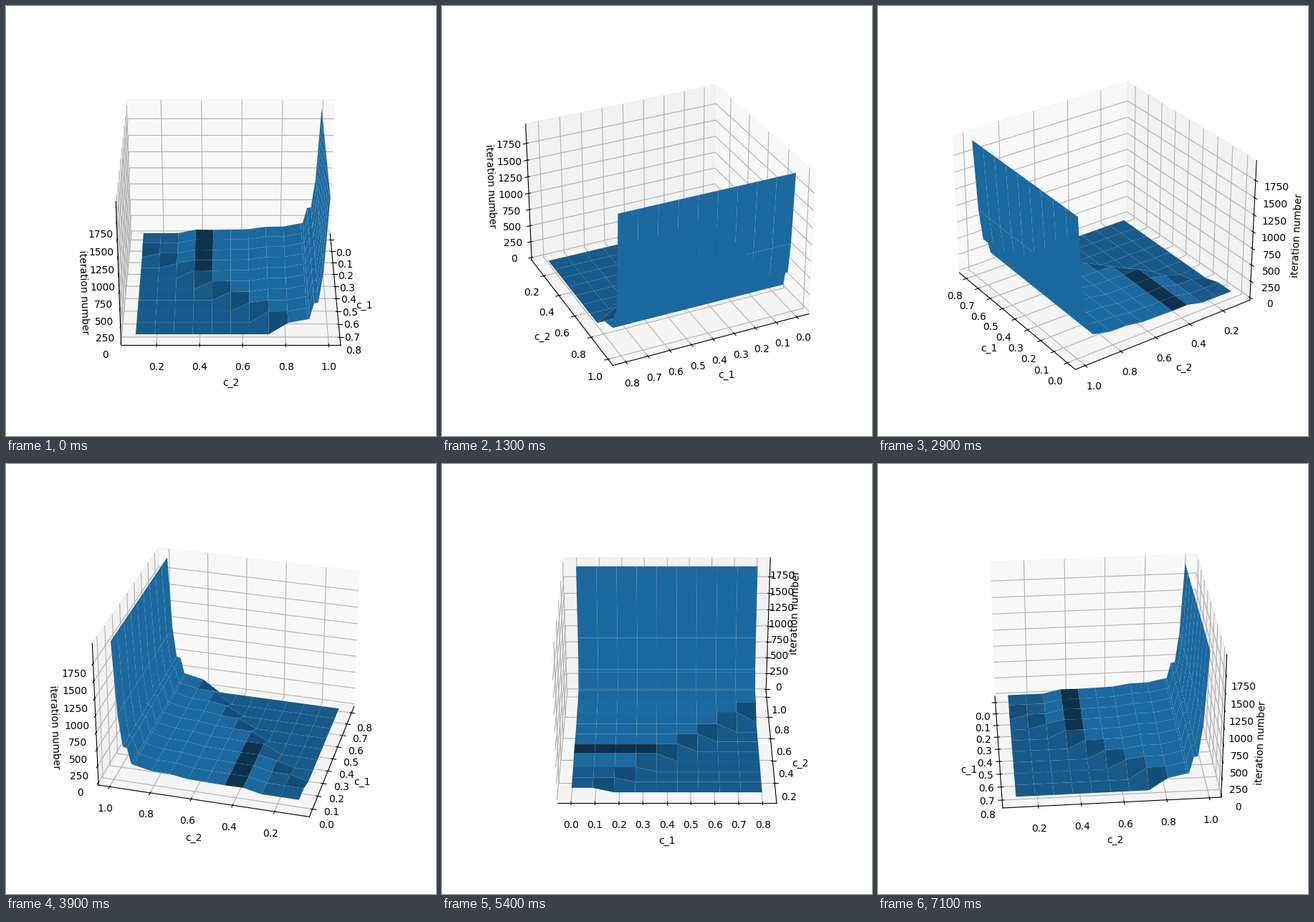
These frames come from a looping animation (600x600 px, 7200 ms). A matplotlib script:

```python
import numpy as np
import matplotlib.pyplot as plt
from matplotlib.animation import FuncAnimation

FRAMES = 72
STEP = 360 / FRAMES

# Key points (c_2, iterations); the curve is straight between them.
CURVE = [(0.28, 68), (0.365, 125), (0.455, 121), (0.633, 131), (0.722, 170),
         (0.811, 173), (0.91, 232), (0.93, 468), (0.95, 480), (0.97, 940),
         (0.99, 1994)]


def padded(lo, hi, margin=0.0):
    """Widen a range by a data margin, then by 1/48 at each end."""
    pad = margin * (hi - lo)
    lo, hi = lo - pad, hi + pad
    edge = (hi - lo) / 48
    return lo - edge, hi + edge


def iterations(x, y):
    """The count depends on c_2 alone and is zero unless c_1 < c_2."""
    return np.where(x < y, np.interp(y, *zip(*CURVE)), 0)


# An even grid, refined where the curve turns steep.
c1 = np.linspace(0, 0.8, 10)
c2 = np.append(np.linspace(0.1, 0.9, 10), np.linspace(0.91, 0.99, 5))
X, Y = np.meshgrid(c1, c2)
Z = iterations(X, Y)

fig = plt.figure(figsize=(6, 6), dpi=100)
ax = fig.add_subplot(projection="3d")
ax.plot_surface(X, Y, Z)

ax.set_xlim(*padded(c1[0], c1[-1], 0.05))
ax.set_ylim(*padded(c2[0], c2[-1], 0.05))
ax.set_zlim(*padded(0, Z.max()))
ax.set_xticks(np.arange(9) / 10)
ax.set_yticks(np.arange(1, 6) / 5)
ax.set_zticks(np.arange(0, 2000, 250))
ax.set_xlabel("c_1")
ax.set_ylabel("c_2")
ax.set_zlabel("iteration number")


def update(i):
    # A tiny offset keeps the choice of side wall stable when seen edge-on.
    ax.view_init(elev=30, azim=max(i * STEP, 1e-6))
    return []


anim = FuncAnimation(fig, update, frames=FRAMES, interval=100,
                     init_func=lambda: update(0), repeat=True, repeat_delay=0)
plt.show()
```
